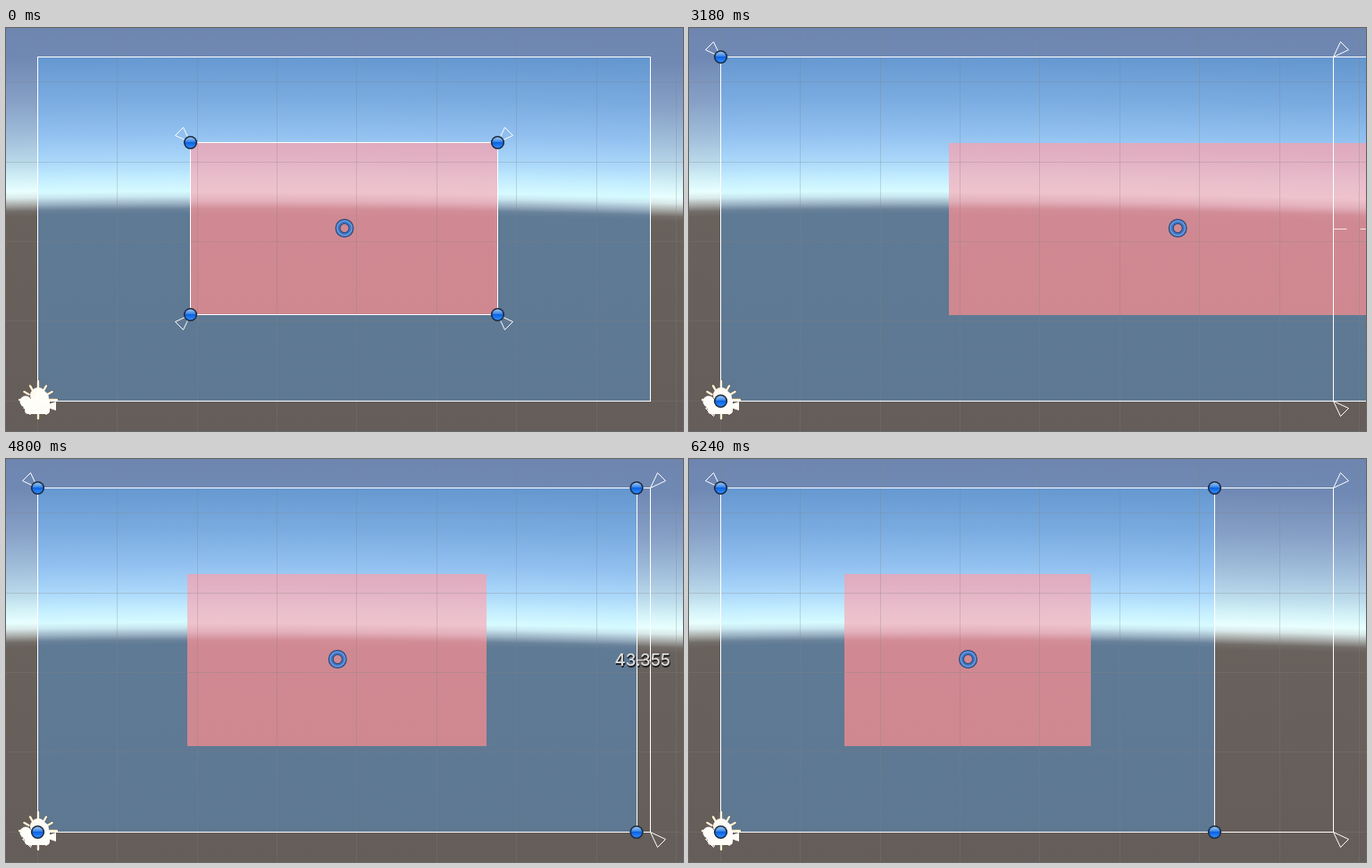
Write an HTML page with a canvas that moves like this. It is 758 px wide and 452 px high and loops after 6.54 s.

```html
<!DOCTYPE html>
<html lang="en">
<head>
<meta charset="utf-8">
<title>Resizing a panel</title>
<style>
html, body { margin: 0; width: 100%; height: 100%; overflow: hidden; background: #66605a; }
canvas { display: block; }
</style>
</head>
<body>
<canvas id="stage" width="758" height="452"></canvas>
<script>
const W = 758, H = 452, LOOP = 6540, STEP = 60;
const LEFT = 35.5, RIGHT = 721.5, TOP = 32.5, BOTTOM = 418.5, MID = 225.5;
const UNITS = 1920 / (RIGHT - LEFT);
const SELECT = 1380, GRAB = 2640, RELEASE = 6240;

// Right edge of the panel while it is dragged: [time, x]
const DRAG = [
  [2580, RIGHT], [3180, 1058], [3240, 1064], [3300, 1064], [3900, 557],
  [3960, 514.597], [4320, 308], [4440, 308], [4500, 327.1847],
  [5100, 1024], [5160, 1027], [5760, 640], [6120, 588.5]
];

const ctx = document.getElementById('stage').getContext('2d');

// Vertical gradient whose horizon bends slightly across the stage
function makeLayer(stops) {
  const layer = document.createElement('canvas');
  layer.width = W;
  layer.height = H;
  const g = layer.getContext('2d');
  const fill = g.createLinearGradient(0, 0, 0, H);
  stops.forEach(([y, color]) => fill.addColorStop(y / H, color));
  g.fillStyle = fill;
  for (let x = 0; x < W; x++) {
    const shift = 1 - 0.0158 * x + 3.13e-5 * x * x;
    g.setTransform(1, 0, 0, 1, 0, shift);
    g.fillRect(x, -10, 1, H + 20);
  }
  return layer;
}

const world = makeLayer([
  [0, '#6e86af'], [32, '#7089b4'], [80, '#859fc5'], [120, '#a0bdda'],
  [150, '#bad9ea'], [170, '#d5f3f8'], [183, '#e9ffff'], [190, '#d9e9e9'],
  [198, '#a6a9a6'], [205, '#736d69'], [211, '#68615c'], [452, '#655d59']
]);
const panel = makeLayer([
  [0, '#6090c8'], [32, '#6698d0'], [80, '#7aabe0'], [120, '#92c1f0'],
  [150, '#abd8fa'], [170, '#c5eeff'], [184, '#d6fbff'], [190, '#c8e6f0'],
  [198, '#98afc1'], [204, '#6a839b'], [209, '#5f7a95'], [452, '#5e7892']
]);
const child = makeLayer([
  [128, '#dfaabe'], [150, '#e3b3c5'], [170, '#eabfcc'], [185, '#eec3cd'],
  [195, '#e3b0bb'], [204, '#d28d98'], [211, '#d08992'], [322, '#cf8890']
]);

const slope = i => (DRAG[i + 1][1] - DRAG[i][1]) / (DRAG[i + 1][0] - DRAG[i][0]);

// Tangent that never overshoots a key
function tangent(i) {
  if (i === 0 || i === DRAG.length - 1) return 0;
  const a = slope(i - 1), b = slope(i);
  return a * b <= 0 ? 0 : 2 * a * b / (a + b);
}

function edgeAt(t) {
  const last = DRAG.length - 1;
  if (t <= DRAG[0][0]) return DRAG[0][1];
  if (t >= DRAG[last][0]) return DRAG[last][1];
  const i = DRAG.findIndex(key => key[0] > t) - 1;
  const [t0, x0] = DRAG[i], [t1, x1] = DRAG[i + 1];
  const d = t1 - t0, u = (t - t0) / d, v = 1 - u;
  return x0 * (1 + 2 * u) * v * v + x1 * (3 - 2 * u) * u * u
    + d * u * v * (v * tangent(i) - u * tangent(i + 1));
}

function paint(layer, x0, y0, x1, y1) {
  const x = Math.round(x0), w = Math.min(W, Math.round(x1)) - x;
  if (w > 0) ctx.drawImage(layer, x, y0, w, y1 - y0, x, y0, w, y1 - y0);
}

function line(...points) {
  ctx.beginPath();
  points.forEach(([x, y]) => ctx.lineTo(x, y));
  ctx.stroke();
}

function disc(x, y, r, fill) {
  ctx.fillStyle = fill;
  ctx.beginPath();
  ctx.arc(x, y, r, 0, 7);
  ctx.fill();
}

function drawGrid() {
  ctx.strokeStyle = 'rgba(128,128,128,.28)';
  for (let k = 0; k < 9; k++) {
    const x = Math.floor(35.3 + 89.4 * k) + 0.5;
    const y = Math.floor(418.3 - 89.4 * k) + 0.5;
    line([x, 0], [x, H]);
    line([0, y], [W, y]);
  }
}

function drawSceneIcon() {
  ctx.save();
  ctx.translate(36, 417);
  ctx.lineCap = 'round';
  for (let k = 0; k < 12; k++) {
    const a = k * Math.PI / 6, c = Math.cos(a), s = Math.sin(a);
    const r = k % 3 ? 18 : 21;
    for (const [width, color] of [[4, 'rgba(90,75,55,.45)'], [2.4, '#fff3d8']]) {
      ctx.lineWidth = width;
      ctx.strokeStyle = color;
      line([c * 12, s * 12], [c * r, s * r]);
    }
  }
  disc(0, -5, 9, '#fffaf0');
  disc(-14, 2, 6.5, '#fffdf8');
  disc(4, -2, 8, '#fffdf8');
  ctx.beginPath();
  ctx.roundRect(-15, -1, 28, 17, 4);
  ctx.moveTo(11, 5);
  ctx.lineTo(20, 2);
  ctx.lineTo(20, 12);
  ctx.lineTo(11, 9);
  ctx.fill();
  ctx.restore();
}

function drawHandle(x, y) {
  disc(x, y, 7.6, '#1d2b40');
  const blue = ctx.createLinearGradient(0, y - 6, 0, y + 6);
  blue.addColorStop(0, '#9cc4f0');
  blue.addColorStop(0.4, '#3f8bea');
  blue.addColorStop(0.5, '#0e63de');
  blue.addColorStop(1, '#2d8cff');
  disc(x, y, 6, blue);
}

function drawPivot(x, y) {
  const rings = [[7.5, 6, '#2d4874'], [7.5, 4, '#3f74c2'], [8.2, 1.2, '#6f9ee0']];
  for (const [r, width, color] of rings) {
    ctx.lineWidth = width;
    ctx.strokeStyle = color;
    ctx.beginPath();
    ctx.arc(x, y, r, 0, 7);
    ctx.stroke();
  }
  ctx.lineWidth = 1;
}

function corners(x0, y0, x1, y1, draw) {
  for (const [x, sx] of [[x0, -1], [x1, 1]])
    for (const [y, sy] of [[y0, -1], [y1, 1]]) draw(x, y, sx, sy);
}

function drawAnchor(x, y, sx, sy) {
  line([x, y], [x + 17 * sx, y + 8 * sy], [x + 8 * sx, y + 17 * sy], [x, y]);
}

function drawDistance(edge) {
  const dir = Math.sign(edge - RIGHT), span = Math.abs(edge - RIGHT);
  ctx.strokeStyle = 'rgba(255,255,255,.8)';
  for (let d = 0; d < span; d += 30)
    line([RIGHT + dir * d, MID], [RIGHT + dir * Math.min(d + 15, span), MID]);
  const label = (span * UNITS).toFixed(3), x = (edge + RIGHT) / 2 - 1;
  ctx.font = '500 18.5px Inter, sans-serif';
  ctx.textAlign = 'center';
  ctx.fillStyle = 'rgba(25,25,25,.85)';
  ctx.fillText(label, x + 0.5, 234);
  ctx.fillText(label, x + 1, 233);
  ctx.fillStyle = '#dedede';
  ctx.fillText(label, x, 232);
}

function render(time) {
  const t = Math.floor(time % LOOP / STEP) * STEP;
  const edge = edgeAt(t), quarter = (edge - LEFT) / 4;
  const parent = t >= SELECT;
  const box = parent ? [LEFT, TOP, edge, BOTTOM] : [206.5, 128.5, 550.5, 321.5];

  ctx.lineWidth = 1;
  ctx.drawImage(world, 0, 0);
  paint(panel, LEFT, 33, edge, 418);
  paint(child, LEFT + quarter, 129, edge - quarter, 322);
  drawGrid();
  drawSceneIcon();

  ctx.strokeStyle = '#fff';
  ctx.strokeRect(LEFT, TOP, RIGHT - LEFT, BOTTOM - TOP);
  const x = Math.floor(box[2]) + 0.5;
  ctx.strokeRect(box[0], box[1], x - box[0], box[3] - box[1]);
  if (parent) corners(LEFT, TOP, RIGHT, BOTTOM, drawAnchor);
  else corners(...box, drawAnchor);
  if (t >= GRAB && t < RELEASE) drawDistance(edge);
  corners(...box, drawHandle);
  drawPivot((LEFT + edge) / 2 + 0.5, 224.5);
}

const start = performance.now();
function tick() {
  render(performance.now() - start);
  requestAnimationFrame(tick);
}
tick();
</script>
</body>
</html>
```
